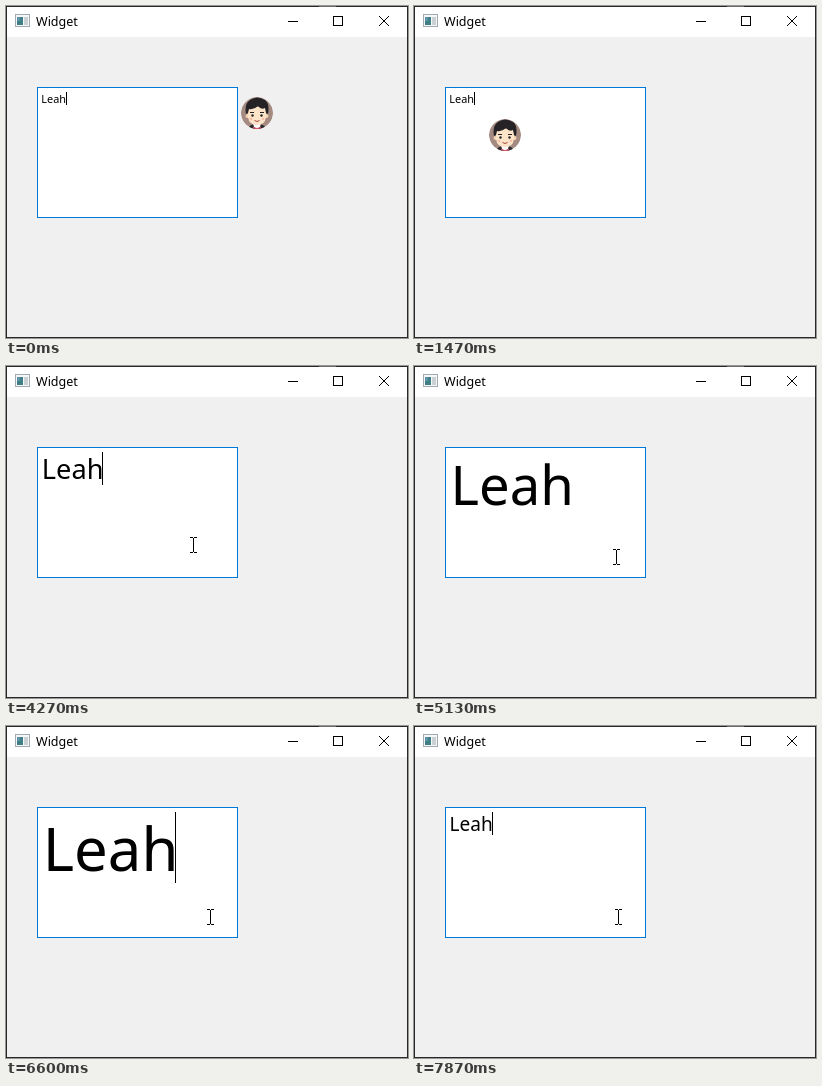
An HTML page for the animation above (8000 ms loop, 402 by 332 pixels).

```html
<!DOCTYPE html>
<html lang="en">
<head>
<meta charset="utf-8">
<title>Widget</title>
<style>
html, body { margin: 0; width: 100%; height: 100%; overflow: hidden; background: #f0f0f0; }
svg { display: block; width: 402px; height: 332px; }
text { font-family: "Noto Sans", "Open Sans", sans-serif; fill: #000; }
.crisp { shape-rendering: crispEdges; }
</style>
</head>
<body>
<svg viewBox="0 0 402 332" xmlns="http://www.w3.org/2000/svg">
  <defs><clipPath id="disc"><circle r="16"/></clipPath></defs>
  <g class="crisp">
    <rect width="402" height="332" fill="#282828"/>
    <rect x="313" width="17" height="1" fill="#6c6c6c"/>
    <rect x="1" y="1" width="400" height="30" fill="#fff"/>
    <rect x="1" y="31" width="400" height="300" fill="#f0f0f0"/>
    <rect x="31.5" y="81.5" width="200" height="130" fill="#fff" stroke="#0078d7"/>
    <path d="M282 15.5h10M327.5 10.5h9v9h-9z" fill="none" stroke="#000"/>
  </g>
  <path d="M373 10l10 10M383 10l-10 10" stroke="#000"/>
  <g class="crisp">
    <rect x="9.5" y="8.5" width="14" height="12" fill="#f4f6f7" stroke="#a3abb0"/>
    <rect x="11" y="11" width="6" height="8" fill="#3f7f86"/>
    <rect x="11" y="11" width="3" height="4" fill="#5d93a8"/>
    <rect x="18" y="11" width="4" height="8" fill="#c9d1d5"/>
  </g>
  <text x="30" y="20" font-size="12.5">Widget</text>

  <text id="word">Leah</text>
  <rect id="caret" class="crisp" y="86" width="1"/>

  <g id="face" clip-path="url(#disc)">
    <circle r="16" fill="#a48a80"/>
    <path d="M-9 16q1-5 9-5t9 5z" fill="#2d2a2e"/>
    <path d="M-4 10h8l-1 4-3 2-3-2z" fill="#fff"/>
    <path d="M-4 14l4 1 4-1v3l-4-1-4 1z" fill="#d8586a"/>
    <circle cx="-9.5" cy="3" r="2" fill="#f6d3b3"/>
    <circle cx="9.5" cy="3" r="2" fill="#f6d3b3"/>
    <path d="M-9-6H9V4Q8 12 0 12T-9 4z" fill="#fde3c8"/>
    <path d="M-11 1Q-13-9-7-13Q0-18 8-13Q13-9 11 1L9 0 8-5Q4-3 1-7-3-3-8-4L-9 0z" fill="#262326"/>
    <path d="M-7-.5h4M3-.5h4" stroke="#262326"/>
    <circle cx="-4.5" cy="2.5" r="1.2" fill="#262326"/>
    <circle cx="4.5" cy="2.5" r="1.2" fill="#262326"/>
    <path d="M-2.5 7.5q2.5 2 5 0" fill="none" stroke="#a5483f"/>
    <circle cx="-6" cy="6" r="1.3" fill="#f6bfa6"/>
    <circle cx="6" cy="6" r="1.3" fill="#f6bfa6"/>
  </g>

  <path id="beam" class="crisp" d="M-3 0h3v1h-3zM1 0h3v1h-3zM0 1h1v14h-1zM-3 15h3v1h-3zM1 15h3v1h-3z"/>
</svg>
<script>
const RATE = 15, TICKS = 120, BLINK = 8, SWAP = 39;
const $ = id => document.getElementById(id);
const word = $("word"), caret = $("caret"), face = $("face"), beam = $("beam");

// wheel bursts: first tick, last tick, change in points
const bursts = [
  [48, 56, 12], [64, 65, 4], [67, 78, 20], [81, 84, 12],
  [94, 99, -12], [104, 106, -12], [109, 112, -14], [117, 118, -4]
];

const ramp = (from, to, n) => Math.min(1, Math.max(0, (n - from) / (to - from)));
const glide = (from, to, n) => {
  const p = ramp(from, to, n);
  return p * p * (3 - 2 * p);
};

// the wheel gathers speed and zooms in steps of two points
const points = n => bursts.reduce((sum, [from, to, by]) =>
  sum + 2 * Math.trunc(by / 2 * ramp(from, to, n) ** 1.5), 8);

function place(el, x, y, shown) {
  el.setAttribute("transform", `translate(${Math.round(x)},${Math.round(y)})`);
  el.setAttribute("visibility", shown ? "visible" : "hidden");
}

function drawText(n) {
  const px = points(n) * 4 / 3;
  word.setAttribute("font-size", px * 1.02);
  word.setAttribute("x", 35 + px * 0.03);
  word.setAttribute("y", 86 + px);
  caret.setAttribute("x", Math.floor(36 + px * 2.28));
  caret.setAttribute("height", Math.ceil(px * 1.207));
  caret.setAttribute("visibility", Math.floor(n / BLINK) % 2 ? "hidden" : "visible");
}

function drawPointers(n) {
  const sweep = glide(14, 22, n), settle = glide(29, 33, n);
  place(face,
    251 - 160 * sweep + settle,
    107 + 22 * sweep + 27 * Math.sin(Math.PI * sweep) + 5 * settle,
    n < SWAP);

  const away = glide(57, 64, n), down = glide(66, 72, n), nudge = glide(87, 89, n);
  place(beam,
    95 + 92 * away + 15 * down + 2 * nudge,
    121 + 50 * away + 12 * down,
    n >= SWAP);
}

function draw(ms) {
  const n = Math.floor((ms + 4) * RATE / 1000) % TICKS;
  drawText(n);
  drawPointers(n);
}

let start;
function loop(now) {
  start ??= now;
  draw(now - start);
  requestAnimationFrame(loop);
}
draw(0);
requestAnimationFrame(loop);
</script>
</body>
</html>
```
